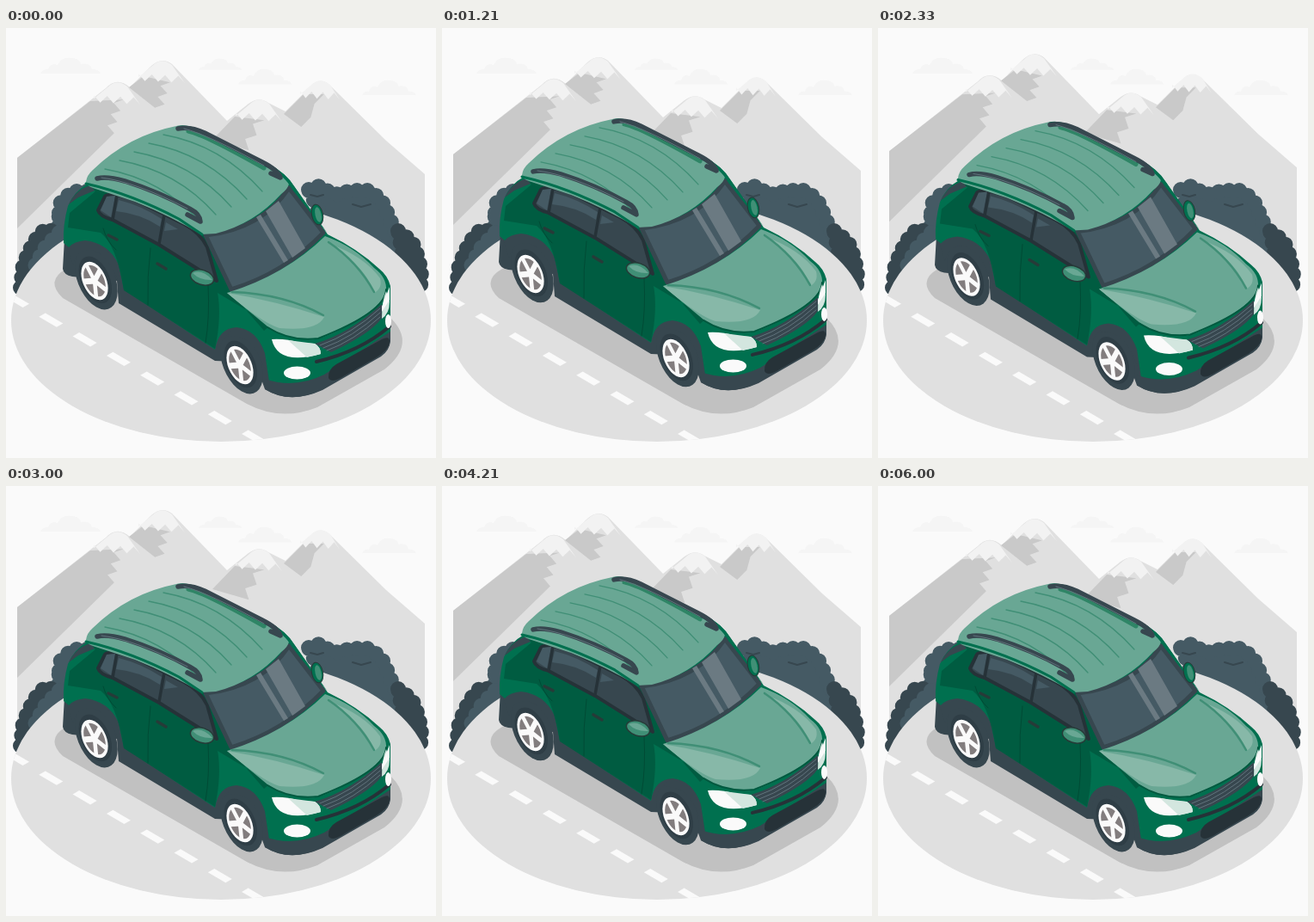
Write an HTML page that moves like this. It is 500 px wide and 500 px high and loops after 6040 ms.

```html
<!DOCTYPE html>
<html lang="en">
<head>
<meta charset="utf-8">
<title>Car on a mountain road</title>
<style>
html, body { margin: 0; width: 100%; height: 100%; overflow: hidden; background: #fafafa; }
svg { display: block; width: 100vw; height: 100vh; }
.white { fill: #fafafa; }
.tint { fill: #d3e6df; }
.paint { fill: #00704f; }
.deep { fill: #005c41; }
.pale { fill: #69a794; }
.shine { fill: #87b8a8; }
.trim { fill: #37474f; }
.glass { fill: #455a64; }
.black { fill: #263238; }
.line { fill: none; stroke-linecap: round; stroke-linejoin: round; }
.crease { stroke: #408f76; }
.seam { stroke: #004b35; }
.rail { stroke: #37474f; stroke-width: 5.5; }
.lobes { stroke-width: 18; stroke-linecap: round; stroke-dasharray: 0 12; }
</style>
</head>
<body>
<svg viewBox="0 0 500 500">
  <defs>
    <path id="cloud" d="M0 19q2-5 9-5q3-8 11-5q5-10 16-8q9 0 11 7q11-2 13 6q8 0 10 5z"/>
    <clipPath id="road"><ellipse cx="250" cy="340" rx="244" ry="141"/></clipPath>
    <g id="wheel" transform="matrix(.8 .45 0 1.05 0 0)">
      <circle cx="2.5" cy="-3" r="31" class="trim"/>
      <circle cx="1" cy="-1.5" r="24" fill="#2f3e46"/>
      <circle r="19.5" class="white"/>
      <circle r="16" fill="#827d7e"/>
      <path id="spokes" stroke="#fafafa" stroke-width="6"/>
    </g>
  </defs>

  <g fill="#f5f5f5">
    <use href="#cloud" x="40" y="34"/>
    <use href="#cloud" transform="translate(224 35) scale(.72)"/>
    <use href="#cloud" transform="translate(270 47) scale(.89 .98)"/>
    <use href="#cloud" transform="translate(414 60) scale(.9 .96)"/>
  </g>

  <g id="hills">
    <path fill="#e0e0e0" d="M13 151L116 70Q129 56 144 69L169 44Q181 33 193 42L257 108 282 88Q294 79 305 87L325 97 354 68Q365 56 377 67L442 131 487 170V310H13z"/>
    <path id="shade" fill="#c9c9c9"/>
    <path id="snow" fill="#f2f2f2"/>
  </g>

  <!-- hedges: a plain outline edged with round lobes -->
  <path class="lobes glass" stroke="#455a64" d="M62 215L63 204 77 190H98L100 240 60 245z"/>
  <path class="lobes trim" stroke="#37474f" d="M17 302L20 275 32 249 46 233 62 240 40 275z"/>
  <path class="lobes glass" stroke="#455a64" d="M62 238L46 255 34 276 80 255z"/>
  <path class="lobes glass" stroke="#455a64" d="M352 188L364 184 382 194 402 189 422 189 436 199 443 214 456 245 460 265 370 225z"/>
  <path class="lobes trim" stroke="#37474f" d="M456 236L472 248 478 263 483 282 482 301 462 266z"/>
  <path class="line" stroke="#37474f" stroke-width="2" d="M403 205l10 3 11-3M354 194l8 2 7-2"/>

  <ellipse cx="250" cy="340" rx="244" ry="141" fill="#e0e0e0"/>
  <path id="dashes" class="white" clip-path="url(#road)"/>
  <path fill="#c1c1c1" d="M70 280Q45 294 66 314L280 437Q320 458 362 441L440 397Q478 367 447 337L390 300 120 260z"/>

  <g id="car">
    <!-- cladding, then painted body -->
    <path class="trim" d="M68 245L66 280Q67 287 77 289L129 294 131 320 243 387 290 389 301 420Q330 438 366 421L437 380Q446 374 447 362V340L240 290 100 240z"/>
    <use href="#wheel" x="103" y="294"/>
    <use href="#wheel" x="272" y="392"/>
    <path class="trim" d="M78 276Q82 257 98 258Q121 262 132 300L137 304 131 270 98 244 70 250zM243 374Q250 357 265 358Q288 360 299 392L306 405 300 365 268 345z"/>
    <path class="paint" d="M95 181Q79 190 72 207Q66 229 67 250L73 255Q79 248 92 247Q119 250 131 275L137 304 243 374Q247 349 268 348Q291 350 301 378L306 411Q346 420 372 405L447 358V300Q444 288 434 280Q408 256 374 240L335 184Q326 169 304 157L229 120Q210 111 195 116z"/>
    <path class="deep" d="M104 190L74 215 72 232 110 238Q129 253 137 305L243 373Q251 335 246 308L308 345 300 352 262 308 231 238 93 181z"/>
    <path class="line seam" d="M168 256Q164 290 165 322M235 299Q237 337 232 366M113 233Q117 248 128 258"/>
    <path class="trim" d="M98 183Q81 188 73 205L84 197 103 189z"/>
    <path class="line" stroke="#263b38" stroke-width="3.5" d="M119 241l10 5M176 274l10 6"/>

    <!-- side windows -->
    <path class="trim" stroke="#263238" stroke-width="4" stroke-linejoin="round" d="M107 212L115 196Q120 190 150 200L207 228Q226 238 234 255L245 294 178 252 124 223Q109 219 107 212z"/>
    <path class="glass" d="M110 212L117 196 127 195 122 220zM131 200Q156 206 181 222L179 231Q157 216 128 213zM186 226L200 234 184 236z"/>
    <path class="line" stroke="#263238" stroke-width="3.5" d="M129 194L124 223M184 217L178 251"/>

    <!-- windshield -->
    <path class="glass" stroke="#37474f" stroke-width="5" stroke-linejoin="round" d="M232 241Q297 234 329 186L369 238Q324 285 262 304z"/>
    <path fill="#6b7a82" d="M291 220l5-3 32 53-5 3zM302 213l15-12 31 55-15 11z"/>

    <!-- roof -->
    <path class="pale" d="M93 179Q94 171 101 165Q142 125 198 114L224 120 302 159Q325 171 329 181Q328 187 320 193Q288 228 244 239L227 240Q192 219 150 202L101 186Q93 183 93 179z"/>
    <path class="line" stroke="#00704f" stroke-width="3" d="M93 181Q146 193 201 222L228 240"/>
    <path id="ribs" class="line crease" stroke-width="1.3"/>
    <path class="line" stroke="#2f8566" stroke-width="5" d="M212 120Q231 124 300 163"/>
    <path class="paint" d="M198 114Q212 111 229 120L304 157Q326 169 335 184L374 239 333 188Q325 172 303 162L224 121z"/>
    <path class="line rail" d="M200 117Q214 114 231 122L298 156Q316 165 319 174L308 169M106 175Q117 172 138 178Q179 191 215 211Q225 216 226 225L211 217"/>
    <path class="line" stroke="#61737c" d="M111 174Q151 179 211 210M207 117Q235 124 300 160"/>

    <!-- hood -->
    <path class="pale" d="M257 308Q325 287 371 242Q405 254 428 279Q443 290 442 305Q439 320 414 336Q381 357 360 362Q328 364 304 347z"/>
    <path class="shine" d="M257 308Q312 317 370 336Q362 353 318 349Q298 343 257 308zM376 251Q416 265 435 291Q438 303 428 308Q419 278 376 251z"/>
    <path class="line crease" stroke-width="2.5" d="M263 307Q323 309 369 334M375 249Q409 272 428 307"/>
    <path class="line" stroke="#00593f" stroke-width="2" d="M304 348Q331 365 363 361Q442 330 442 304"/>

    <!-- front -->
    <path class="trim" d="M359 367Q398 356 437 321V337Q425 355 378 377z"/>
    <path id="grille" class="line" stroke="#61737c"/>
    <path class="line" stroke="#263238" stroke-width="4" d="M361 388Q412 376 446 347"/>
    <path class="white" d="M309 362Q326 361 341 366L359 367Q366 371 366 379Q316 393 309 362z"/>
    <path class="tint" d="M328 363L359 367Q366 371 366 379L350 383zM442 306Q437 317 437 338Q446 332 446 318z"/>
    <path class="white" d="M446 301L437 324V330L446 316z"/>
    <ellipse cx="338.500" cy="401" rx="15.500" ry="7.500" class="white"/>
    <ellipse cx="444.500" cy="341" rx="3.500" ry="8" class="white"/>
    <path class="trim" d="M301 408Q335 420 370 403L447 353V364Q446 375 436 382L368 421Q330 438 301 420z"/>
    <path class="black" d="M375 407Q374 397 384 391L437 362Q447 357 446 366Q444 375 431 383L389 407Q378 413 375 407z"/>

    <!-- mirrors -->
    <ellipse rx="14" ry="8.500" transform="translate(228 290) rotate(18)" fill="#408f76" stroke="#263b38" stroke-width="1.5"/>
    <path class="pale" d="M217 285Q228 280 240 293Q226 294 217 285z"/>
    <ellipse rx="6.500" ry="12" transform="translate(362 217) rotate(-12)" class="paint" stroke="#263b38"/>
    <ellipse rx="3.500" ry="9" transform="translate(363 217) rotate(-12)" fill="#408f76"/>
  </g>
</svg>
<script>
const $ = id => document.getElementById(id);
const LOOP = 6040;

// Joins n path pieces into one outline
const trace = (id, n, piece) =>
  $(id).setAttribute('d', Array.from({ length: n }, (_, i) => piece(i)).join(''));

// Zigzag from one point to another, swinging d to either side
function zigzag(x0, y0, x1, y1, n, d) {
  const len = Math.hypot(x1 - x0, y1 - y0);
  let path = '';
  for (let i = 0; i <= n; i++) {
    const swing = i % 2 ? d / len : -d / len;
    path += `L${x0 + (x1 - x0) * i / n - (y1 - y0) * swing} ${y0 + (y1 - y0) * i / n + (x1 - x0) * swing}`;
  }
  return path;
}

const shades = [
  'M13 233V151L98 85' + zigzag(132, 82, 121, 121, 6, 5),
  'M143 69L160 56' + zigzag(186, 62, 178, 94, 5, 5),
  'M240 130L266 103' + zigzag(296, 105, 278, 140, 4, 5),
  'M323 100L346 77' + zigzag(368, 76, 345, 116, 3, 2)
];
trace('shade', shades.length, i => shades[i] + 'z');

const peaks = [[129, 62, 27], [181, 37, 27], [294, 82, 27], [365, 60, 23]];
trace('snow', peaks.length, i => {
  const [x, y, w] = peaks[i];
  return `M${x - w} ${y + .75 * w}L${x - 11} ${y + 7}Q${x} ${y - 4} ${x + 12} ${y + 6}` +
    zigzag(x + w, y + .85 * w, x - w, y + .75 * w, 7, 4) + 'z';
});

trace('dashes', 8, i =>
  `M${39.3 * i - 1} ${313 + 22.7 * i}l20.500 12 7.500-4.300-20.500-12z`);

trace('ribs', 5, i =>
  `M${183 - 17 * i} ${124 + 10 * i}Q${250 - 17 * i} ${136 + 10 * i} ${298 - 18 * i} ${190 + 9 * i}`);

trace('grille', 3, i =>
  `M${365 + 4 * i} ${369 + 3 * i}Q${402 + i} ${356 + 4 * i} 435 ${326 + 5 * i}`);

trace('spokes', 5, i => {
  const a = (i * 72 - 62) * Math.PI / 180;
  return `M0 0L${17 * Math.cos(a)} ${17 * Math.sin(a)}`;
});

// Steady rise and fall by ten units over one period
function bob(id, t, period) {
  const y = -10 * (1 - Math.abs(1 - 2 * (t % period) / period));
  $(id).setAttribute('transform', `translate(0 ${y})`);
}

function draw() {
  const t = performance.now() % LOOP;
  bob('hills', t, 6000);
  bob('car', t, 3000);
  requestAnimationFrame(draw);
}
draw();
</script>
</body>
</html>
```
